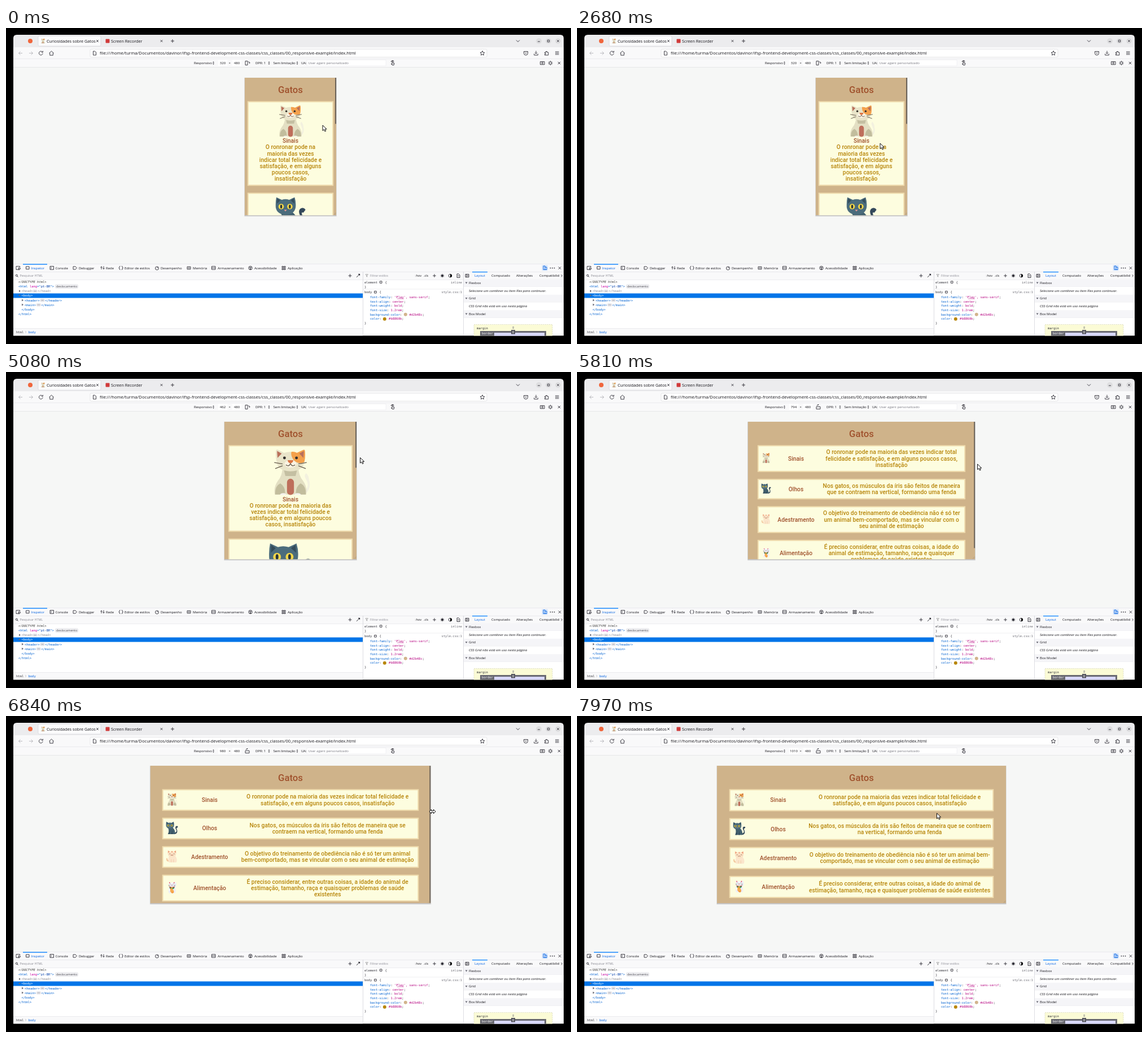
Animation, 1001 px wide and 559 px high, one loop 8000 ms. Source, as an HTML page:

```html
<!DOCTYPE html>
<html lang="pt-BR">
<head>
<meta charset="utf-8">
<title>Gatos</title>
<style>
html, body { margin: 0; width: 100%; height: 100%; overflow: hidden; background: #000; }
svg { display: block; }
text { font-family: "Open Sans", "Noto Sans", sans-serif; white-space: pre; }
.code { font-family: "DejaVu Sans Mono", monospace; }
.page { font-family: Roboto, Arial, sans-serif; font-weight: 500; text-anchor: middle; }
.mid { text-anchor: middle; }
.line { fill: none; stroke: #2b2a33; stroke-width: .9; }
</style>
</head>
<body>
<svg id="stage" width="1001" height="559" viewBox="0 0 1001 559">
<defs>
  <symbol id="cat0" viewBox="0 0 100 100">
    <path d="M78 92Q93 82 84 66Q78 56 84 52Q90 58 90 66Q96 84 82 97Z" fill="#f3f1df"/>
    <path d="M33 40H67Q68 58 77 68Q87 82 84 98H16Q13 82 23 68Q32 58 33 40Z" fill="#e3dfc3"/>
    <path d="M28 74Q16 80 17 98H38Q40 82 28 74ZM72 74Q84 80 83 98H62Q60 82 72 74Z" fill="#c2bd9d"/>
    <path d="M36 46H64L61 58H39Z" fill="#c4bfa2"/>
    <rect x="42.5" y="64" width="15" height="35" rx="7.5" fill="#be6e5b"/>
    <path d="M19 2Q21 0 24 2L36 8Q50 4 64 8L77 2Q80 0 81 3Q83 14 80 26Q79 47 50 48Q21 47 20 26Q17 14 19 2Z" fill="#e9e4c9"/>
    <path d="M52 6Q58 5 64 8L77 2Q80 0 81 3Q83 14 80 28Q67 34 57 24Q50 14 52 6Z" fill="#f4a14c"/>
    <path d="M21 4L31 9.5L22 19ZM79 4L69 9.5L78 19Z" fill="#b9705a"/>
    <ellipse cx="50" cy="32" rx="13" ry="8" fill="#fbf3e2"/>
    <path d="M44 24H56Q56 29 50 31Q44 29 44 24Z" fill="#dc7443"/>
    <path d="M50 31Q47 39 40 34M50 31Q53 39 60 34M33 32L15 29M33 36L17 42M67 32L85 29M67 36L83 42" fill="none" stroke="#665c4e" stroke-width="1.7"/>
    <circle cx="37" cy="19" r="3" fill="#33302c"/><circle cx="63" cy="19" r="3" fill="#33302c"/>
    <path d="M27 99a8 6 0 0 1 15 0ZM58 99a8 6 0 0 1 15 0Z" fill="#f6f3ee"/>
  </symbol>
  <symbol id="cat1" viewBox="0 0 100 100">
    <path d="M66 88Q88 87 85 68Q70 45 82 37Q91 32 97 41L90 50Q82 47 87 58Q102 94 70 98Z" fill="#33485a"/>
    <path d="M20 50H58Q76 66 74 99H18Q30 76 20 50Z" fill="#42606e"/>
    <path d="M34 62L32 99H24ZM52 66L54 99H46Z" fill="#304756"/>
    <path d="M6 2L23 10Q34 6 46 10L63 2Q68 18 66 34Q62 56 35 56Q8 56 4 34Q3 16 6 2Z" fill="#4b6c7c"/>
    <path d="M8 5L18 12L8 22ZM61 5L51 12L62 22Z" fill="#344c5b"/>
    <circle cx="21" cy="31" r="8.5" fill="#f2d64a"/><circle cx="48" cy="31" r="8.5" fill="#f2d64a"/>
    <ellipse cx="21" cy="31" rx="3" ry="6" fill="#26323b"/><ellipse cx="48" cy="31" rx="3" ry="6" fill="#26323b"/>
    <path d="M30 41H39L34 46Z" fill="#e79b98"/>
  </symbol>
  <symbol id="cat2" viewBox="0 0 100 100">
    <path d="M28 90Q4 92 6 68Q10 54 15 68Q14 82 30 78Z" fill="#f3c9a0"/>
    <path d="M28 46H76Q96 72 84 97H26Q16 72 28 46Z" fill="#fbe6cc"/>
    <path d="M18 2L36 12Q50 8 62 12L82 2Q86 22 80 40Q70 56 50 56Q28 56 20 40Q13 20 18 2Z" fill="#fbe3c5"/>
    <path d="M20 5L32 13L20 23ZM80 5L67 13L80 23ZM45 9H55L50 24Z" fill="#ec9873"/>
    <path d="M28 32Q34 26 40 32M60 32Q66 26 72 32M50 38Q46 45 40 41M50 38Q54 45 60 41" fill="none" stroke="#8c5b45" stroke-width="3"/>
    <path d="M46 35H54L50 40Z" fill="#df7060"/>
    <path d="M44 72V96M62 72V96" stroke="#efc7a0" stroke-width="3"/>
  </symbol>
  <symbol id="cat3" viewBox="0 0 100 100">
    <path d="M64 42Q78 34 72 16Q72 6 81 10Q90 28 78 50Z" fill="#eef0f7"/>
    <path d="M30 44H70Q86 70 75 94H27Q16 70 30 44Z" fill="#edeef6"/>
    <path d="M27 5L39 12H59L71 5Q76 22 70 36Q62 46 49 46Q36 46 28 36Q22 20 27 5Z" fill="#f5f5fa"/>
    <path d="M28 7L38 13L28 20ZM70 7L60 13L70 20Z" fill="#e25c6e"/>
    <path d="M33 25Q38 19 42 25M56 25Q61 19 65 25M49 31Q45 38 39 34M49 31Q53 38 59 34M22 30L33 33M22 37L33 36M76 30L65 33M76 37L65 36" fill="none" stroke="#545062" stroke-width="2"/>
    <path d="M45 28H53L49 33Z" fill="#ec6279"/>
    <path d="M29 43Q50 52 71 43L67 58Q50 68 33 58Z" fill="#369457"/>
    <path d="M29 42Q50 52 71 42V47Q50 56 29 47Z" fill="#d73d4b"/>
    <circle cx="50" cy="51" r="5" fill="#f7c24c"/>
    <ellipse cx="49" cy="75" rx="13" ry="21" transform="rotate(-28 49 75)" fill="#f49c3d"/>
    <path d="M42 67L56 82M48 64L60 77M38 74L50 87" stroke="#ffd184" stroke-width="3"/>
    <circle cx="31" cy="68" r="7" fill="#fff"/>
  </symbol>
  <clipPath id="view"><rect id="viewRect" y="88" height="243.36"/></clipPath>
  <clipPath id="window"><path d="M13 544.5V18Q13 12 19 12H982Q988 12 988 18V544.5Z"/></clipPath>
</defs>
<rect width="1001" height="559"/>
<g id="chrome" clip-path="url(#window)"></g>
<g id="size"></g>
<g id="device"></g>
<path id="arrow" d="M0 0V9.6L2.3 7.5L4 11L5.7 10.2L4.1 6.9H7.2Z" fill="#fff" stroke="#111" stroke-width="1"/>
<path id="resize" d="M-5.5 0L-2 -3.6V-1.3H2V-3.6L5.5 0L2 3.6V1.3H-2V3.6Z" fill="#fff" stroke="#111" stroke-width="1"/>
</svg>
<script>
const $ = id => document.getElementById(id);
const esc = s => s.replace(/&/g, '&amp;').replace(/</g, '&lt;');
const rect = (x, y, w, h, fill, more = '') => `<rect x="${x}" y="${y}" width="${w}" height="${h}" fill="${fill}" ${more}/>`;
const text = (x, y, s, size = 6, fill = '#15141a', cls = '') =>
  `<text x="${x}" y="${y}" font-size="${size}" fill="${fill}" class="${cls}">${esc(s)}</text>`;
const line = (d, color = '#2b2a33', width = .9) => `<path class="line" d="${d}" style="stroke:${color};stroke-width:${width}"/>`;
const dot = (x, y, r, fill) => `<circle cx="${x}" cy="${y}" r="${r}" fill="${fill}"/>`;
const ring = (x, y, r) => `<circle class="line" cx="${x}" cy="${y}" r="${r}"/>`;
const cross = (x, y, r = 2) => line(`M${x - r} ${y - r}l${2 * r} ${2 * r}m0 ${-2 * r}l${-2 * r} ${2 * r}`);
const plus = (x, y, r = 3) => line(`M${x - r} ${y}h${2 * r}M${x} ${y - r}v${2 * r}`);
const box = (x, y, w, h) => line(`M${x} ${y}h${w}v${h}h${-w}Z`);
const picker = (x, y) => `<path d="M${x - 1.4} ${y - .7}h2.8l-1.4 -2ZM${x - 1.4} ${y + .7}h2.8l-1.4 2Z" fill="#2b2a33"/>`;
const twisty = (x, y, open) => `<path d="${open ? `M${x - 2} ${y - 1}h4l-2 3Z` : `M${x - 1} ${y - 2}v4l3 -2Z`}" fill="#6a6a75"/>`;
// Code made of [text, colour] runs.
const code = (x, y, ...runs) => `<text x="${x}" y="${y}" font-size="5.5" class="code">` +
  runs.map(([s, c]) => `<tspan fill="${c}">${esc(s)}</tspan>`).join('') + '</text>';
const badge = (x, y) => rect(x, y - 2, 7, 4.4, '#eeeef2', 'rx="1.5" stroke="#b9b9c2" stroke-width=".4"') +
  [2, 3.5, 5].map(d => dot(x + d, y + .2, .5, '#55555f')).join('');

function browserBars() {
  return rect(13, 12, 975, 22, '#ececee') + rect(13, 34, 975, 20, '#f9f9fa') + rect(13, 54, 975, 15, '#f9f9fa') +
    rect(13, 54, 975, .5, '#dcdce0') + rect(13, 69, 975, 348, '#f6f7f6') + rect(13, 69, 975, .6, '#dedee2') +
    dot(43, 23, 4, '#f0663c') +
    rect(57, 14, 111, 18, '#fbfbfc', 'rx="2" stroke="#cfcfd4" stroke-width=".6"') +
    '<use href="#cat0" x="61" y="18.5" width="9" height="9"/>' + text(72, 25.6, 'Curiosidades sobre Gatos', 7.27) + cross(162, 23, 1.8) +
    rect(176.5, 19.5, 7, 7, '#d03a3a', 'rx="1"') + text(186, 25.6, 'Screen Recorder', 7.27) + cross(275.5, 23, 1.8) + plus(295, 23) +
    line('M904 21.5l3 3l3 -3') + [944, 961, 978].map(x => dot(x, 23, 5, '#dedee0')).join('') +
    line('M942 24h4') + box(959.3, 21.3, 3.4, 3.4) + cross(978, 23, 1.7) +
    line('M29 44.5h-6.5m3 -3l-3 3l3 3M41 44.5h6.5m-3 -3l3 3l-3 3', '#b5b5ba') +
    line('M64.6 42.5a3.4 3.4 0 1 0 .6 2.5M65.3 40.5v2.5h-2.5') + line('M76.5 44.5l4 -3.6l4 3.6M77.7 44v4.2h5.6V44') +
    rect(149, 37.5, 703, 14, '#fff', 'rx="2" stroke="#d8d8dc" stroke-width=".6"') +
    line('M154.5 41h3l2 2v5h-5Z') +
    text(166, 47.2, 'file:///home/turma/Documentos/davinor/ifsp-frontend-development-css-classes/css_classes/00_responsive-example/index.html', 7.65) +
    line('M844 40.5l1.2 2.6l2.8 .3l-2.1 1.9l.6 2.8l-2.5 -1.5l-2.5 1.5l.6 -2.8l-2.1 -1.9l2.8 -.3Z') +
    line('M917.5 41.5h7v3a3.5 3.5 0 0 1 -7 0ZM919.3 43.4l1.7 1.7l1.7 -1.7') + line('M939 40.5v5m-2 -2l2 2l2 -2M935.7 45.5v2.5h6.6v-2.5') +
    line('M954.5 43h2v-1.5h2V43h2.3v5h-6.3v-1.6h1.4v-1.8h-1.4Z') + line('M973 42h6.6M973 44.4h6.6M973 46.8h6.6') +
    text(333, 64.2, 'Responsivo', 6) + picker(367.5, 62) + text(396.2, 64.2, '×', 6, '#333', 'mid') +
    rect(376, 56.5, 16, 10.5, '#fff') + rect(401, 56.5, 16, 10.5, '#fff') + text(409, 64.2, '480', 6.1, '#15141a', 'mid') +
    text(442, 64.2, 'DPR: 1', 6) + picker(466, 62) + text(473.5, 64.2, 'Sem limitação', 6) + picker(516, 62) +
    text(523, 64.2, 'UA:', 6) + rect(533, 56.5, 140, 10.5, '#fff', 'stroke="#e6e6ea" stroke-width=".5"') +
    text(535.5, 64.2, 'User agent personalizado', 6, '#777780') +
    line('M684 64.5v-5.5a.9 .9 0 0 1 1.8 0v3h2l-.6 3.6h-3l-1.8 -2.3ZM682 60a3 3 0 0 1 5.5 -1') +
    box(946.5, 59.5, 7.5, 5.2) + ring(950.2, 62, 1.3) + ring(964.5, 62, 2.2) +
    line('M964.5 58v1.4m0 5.2v1.4M960.5 62h1.4m5.2 0h1.4M961.7 59.2l1 1m3.6 3.6l1 1m0 -5.6l-1 1m-3.6 3.6l-1 1') + cross(980, 62, 2.2);
}

function inspectorBars() {
  const tabs = [[44.5, 'Inspetor'], [87.5, 'Console'], [129, 'Debugger'], [177, 'Rede'], [210, 'Editor de estilos'],
    [274, 'Desempenho'], [331, 'Memória'], [375, 'Armazenamento'], [440, 'Acessibilidade'], [499, 'Aplicação']];
  const icons = line('M24 427.5h-6v-6h6.5v2.5M21.5 424l4.5 1.6l-1.9 .7l-.8 1.9Z') + box(35.5, 422, 5.5, 4.6) +
    box(78, 421.5, 6.5, 5.8) + line('M79.3 423l1.3 1.4l-1.3 1.4') + line('M119 422h4l2.5 2.5l-2.5 2.5h-4Z') +
    line('M169 427v-5m-1.6 1.6l1.6 -1.6l1.6 1.6M173 421.5v5m-1.6 -1.6l1.6 1.6l1.6 -1.6') +
    line('M202.5 421.2q-1.6 0 -1.4 1.6q0 1.4 -1.3 1.6q1.3 .2 1.3 1.6q-.2 1.6 1.4 1.6M204.8 421.2q1.6 0 1.4 1.6q0 1.4 1.3 1.6q-1.3 .2 -1.3 1.6q.2 1.6 -1.4 1.6') +
    ring(267.5, 425, 3) + line('M267.5 425l1.5 -2') + box(321, 422.3, 6, 4.4) + line('M323 423.5v2M325 423.5v2') +
    box(364.5, 421.6, 6.4, 5.6) + line('M364.5 424.4h6.4') + ring(433, 424.5, 3.2) + line('M431 423.6h4M433 423.6v1.6l-1 2m1 -2l1 2') +
    box(489, 421.6, 2.3, 2.3) + box(492.7, 421.6, 2.3, 2.3) + box(489, 425.2, 2.3, 2.3) + box(492.7, 425.2, 2.3, 2.3);
  return rect(13, 417, 975, 127.5, '#fff') + rect(13, 417, 975, 28, '#f9f9fa') +
    [417, 431, 445].map(y => rect(13, y, 975, .5, '#d9d9de')).join('') + rect(30, 417.3, 43, 1.4, '#0a84ff') + icons +
    tabs.map(([x, s], i) => text(x, 426.6, s, 6, i ? '#15141a' : '#0061e0')).join('') +
    rect(949.5, 419.3, 10, 10, '#d7e6fb') + line('M952 421h3v6.5h-3ZM955 423h3v4.5h-3', '#0061e0') +
    [964.5, 968, 971.5].map(x => dot(x, 424.6, .9, '#2b2a33')).join('') + cross(981, 424.6, 2.2) +
    ring(18.8, 437.7, 1.6) + line('M20 439l1.6 1.6') + text(24.5, 440.3, 'Pesquisar HTML', 5.4, '#8a8a93') +
    plus(609.5, 438.2) + line('M621 441l4 -4M624 435l3 3') + dot(626, 436, 1.3, '#2b2a33');
}

function tree() {
  const tag = '#0061d0', grey = '#8d8d96', white = '#fff';
  return rect(13, 469.5, 619, 8, '#0074e8') +
    '<g font-style="italic">' + code(22, 451.3, ['<!DOCTYPE html>', '#333']) + '</g>' +
    code(22, 459.2, ['<html ', tag], ['lang', '#c800a1'], ['="', tag], ['pt-BR', '#003eaa'], ['">', tag]) +
    rect(87.5, 453.8, 40, 6.6, '#f6f6f8', 'rx="2" stroke="#c8c8d0" stroke-width=".5"') + text(89, 459, 'deslocamento', 5.7, '#45454e') +
    twisty(24, 465.3) + code(27.5, 467.2, ['<head>', grey]) + badge(48, 465.2) + code(56.3, 467.2, ['</head>', grey]) +
    twisty(24, 473, true) + code(27.5, 475.4, ['<body>', white]) +
    twisty(29, 481.5) + code(33, 483.5, ['<header>', tag]) + badge(61, 481.6) + code(69.3, 483.5, ['</header>', tag]) +
    twisty(29, 489.6) + code(33, 491.6, ['<main>', tag]) + badge(54.3, 489.6) + code(62.5, 491.6, ['</main>', tag]) +
    code(27.5, 499.6, ['</body>', tag]) + code(22, 507.7, ['</html>', tag]) +
    rect(13, 531.5, 619, 13, '#f9f9fa') + rect(13, 531.3, 619, .5, '#d9d9de') +
    code(18, 540, ['html', '#33333b']) + line('M34 536l1.6 1.8l-1.6 1.8', '#99999f', .6) + code(39.5, 540, ['body', '#0061e0']);
}

function styles() {
  const ink = '#33333b', prop = '#0061d0', val = '#b5007f';
  const rules = [['font-family', "'Play', sans-serif"], ['text-align', 'center'], ['font-weight', 'bold'], ['font-size', '1.2rem'],
    ['background-color', '   #d2b48c'], ['color', '   #b8860b']];
  return rect(632, 431, .7, 113.5, '#cfcfd6') +
    line('M637 435.8h4.4l-1.7 2v2.4l-1 -.7v-1.7Z', '#777', .6) + text(645, 440.3, 'Filtrar estilos', 5.4, '#8a8a93') +
    text(725, 440.2, ':hov', 5.6) + text(740, 440.2, '.cls', 5.6) + plus(759, 438.2, 2.8) + dot(773, 438.2, 2, '#2b2a33') +
    line('M773 434.6v7.2M769.4 438.2h7.2M770.5 435.7l5 5m0 -5l-5 5', '#2b2a33', .6) +
    ring(787, 438.2, 2.8) + '<path d="M787 435.4a2.8 2.8 0 0 1 0 5.6Z"/>' + line('M799 435h3l2 2v4.5h-5ZM800.3 438.5h2.3') +
    code(635, 451.5, ['element', ink]) + box(662.4, 447.9, 3.6, 3.4) + code(671.5, 451.5, ['{', ink]) + code(788, 451.5, ['inline', '#66666f']) +
    code(635, 459.6, ['}', ink]) + rect(633, 461.7, 177, .5, '#dedee3') +
    code(635, 469, ['body', ink]) + box(652.6, 465.5, 3.6, 3.4) + code(661.5, 469, ['{', ink]) + code(771.5, 469, ['style.css:1', '#66666f']) +
    rules.map(([p, v], i) => code(645, 477.8 + i * 7.7, [p, prop], [': ', ink], [v, val], [';', ink])).join('') +
    line('M693 479h12', val, .5) + dot(707.8, 506.8, 3, '#d2b48c') + dot(670.8, 514.7, 3, '#b8860b') +
    code(635, 523.6, ['}', ink]);
}

function layoutPane() {
  const heads = [[450.6, 'Flexbox'], [478.2, 'Grid'], [505.6, 'Box Model']];
  return rect(810, 431, .7, 113.5, '#cfcfd6') + box(814, 435.6, 6, 5.2) + line('M816 435.6v5.2M819 437l-1.4 1.2l1.4 1.2') +
    rect(826, 431, 27, 1.3, '#0a84ff') + text(830, 440.3, 'Layout', 6, '#0061e0') + text(860, 440.3, 'Computado', 6) +
    text(904, 440.3, 'Alterações', 6) + text(945, 440.3, 'Compatibilid', 6) + line('M983.5 436.5l2 1.8l-2 1.8') +
    heads.map(([y, s]) => rect(811, y - 6.4, 177, 13, '#f5f5f8') + rect(811, y + 6.6, 177, .4, '#dedee3') +
      twisty(815.6, y - .2, true) + text(820, y + 2.2, s, 6)).join('') +
    '<g font-style="italic">' + text(820, 466.5, 'Selecione um contêiner ou item Flex para continuar.', 6) +
    text(820, 494, 'CSS Grid não está em uso nesta página', 6) + '</g>' +
    rect(829, 524.5, 139, 22, '#fbfbd6', 'stroke="#c9c9b4" stroke-width=".6" stroke-dasharray="2 1.5"') +
    code(834, 532.6, ['margin', '#33333b']) + code(897, 531.5, ['8', '#77777f']) +
    rect(840, 536, 117, 9, '#696971') + code(843, 542.4, ['border', '#f4f4f6']) + rect(865, 539, 89, 6, '#d9d9fb') +
    rect(895, 534, 7, 7.5, '#55555e') + code(896.8, 539.8, ['0', '#fff']);
}

$('chrome').innerHTML = browserBars() + inspectorBars() + tree() + styles() + layoutPane();

const SCALE = .507, MID = 504, TOP = 88, VIEW = 480 * SCALE, LEAD = 11.15, GAP = 12.1, PAD = 7;
const SIENNA = '#a0522d', GOLD = '#b8860b';
const cards = [
  ['Sinais', 'O ronronar pode na maioria das vezes indicar total felicidade e satisfação, e em alguns poucos casos, insatisfação'],
  ['Olhos', 'Nos gatos, os músculos da íris são feitos de maneira que se contraem na vertical, formando uma fenda'],
  ['Adestramento', 'O objetivo do treinamento de obediência não é só ter um animal bem-comportado, mas se vincular com o seu animal de estimação'],
  ['Alimentação', 'É preciso considerar, entre outras coisas, a idade do animal de estimação, tamanho, raça e quaisquer problemas de saúde existentes'],
];

const pen = document.createElement('canvas').getContext('2d');
pen.font = '100px Roboto, Arial, sans-serif';
pen.fontKerning = 'none';

// Breaks at spaces and after hyphens; the limit is in em.
function wrap(copy, limit) {
  const lines = [''];
  for (const word of copy.match(/[^\s-]+-?\s?/g)) {
    const last = lines.length - 1;
    if (pen.measureText((lines[last] + word).trim()).width > limit * 100) lines.push(word);
    else lines[last] += word;
  }
  return lines.map(s => s.trim());
}

function page(cssWidth, scrolled) {
  const width = cssWidth * SCALE, left = MID - width / 2, wide = cssWidth >= 600;
  const margin = width * (wide ? .0425 : .03), cardW = width - 2 * margin, x = left + margin;
  const limit = wide ? 24 + (cardW - 368) * .0753 : cardW * .071;
  const label = (cx, cy, s, fill) => text(cx, cy + 3.5, s, 10.3, fill, 'page');
  const icon = (i, cx, y, size) => `<use href="#cat${i}" x="${cx - size / 2}" y="${y}" width="${size}" height="${size}"/>`;
  let y = 129.4, out = text(MID, 114.5, 'Gatos', 16.7, SIENNA, 'page');
  cards.forEach(([name, copy], i) => {
    const lines = wrap(copy, limit), slot = wide ? cardW * .0535 : width * .356;
    const inner = wide ? Math.max(lines.length * LEAD, slot) : slot + LEAD * (lines.length + 1);
    const h = inner + 2 * PAD, cy = y + h / 2;
    out += rect(x + 1, y + 1, cardW - 2, h - 2, '#fdfddf', 'stroke="#efdbad" stroke-width="2"');
    if (wide) {
      const size = cardW * .05;
      out += icon(i, x + 6 + size / 2, cy - 1 - size / 2, size) + label(x + cardW * .185, cy, name, SIENNA);
    } else {
      out += icon(i, MID, y + PAD, width * .35) + label(MID, y + PAD + slot + LEAD / 2, name, SIENNA);
    }
    const first = wide ? cy - (lines.length - 1) * LEAD / 2 : y + PAD + slot + LEAD * 1.5;
    const cx = wide ? x + cardW * .6445 : MID;
    lines.forEach((s, n) => out += label(cx, first + n * LEAD, s, GOLD));
    y += h + GAP;
  });
  const content = y - GAP + 4 - TOP, range = Math.max(0, content - VIEW);
  const thumb = VIEW * VIEW / content - (range > 5 ? 4 : 0);
  $('viewRect').setAttribute('x', left);
  $('viewRect').setAttribute('width', width);
  return rect(left, TOP + .6, width, VIEW + .6, '#c9c9cc', 'stroke="#00000018" stroke-width="1.6"') +
    `<g clip-path="url(#view)">${rect(left, TOP, width, VIEW, '#cfb38a')}
    <g transform="translate(0 ${-scrolled * range})">${out}</g>
    ${range > 0 ? rect(left + width - 2, TOP + scrolled * (VIEW - thumb), 2, thumb, '#655e56') : ''}</g>` +
    line(`M${left + width - 4.5} 330.5l4 -4M${left + width - 2.5} 330.5l2 -2`, '#a5937a', .6);
}

// Keys are [time, ...values], joined by straight lines.
function at(keys, t) {
  const i = keys.findIndex(k => k[0] > t);
  if (i === 0) return keys[0].slice(1);
  if (i < 0) return keys[keys.length - 1].slice(1);
  const a = keys[i - 1], b = keys[i], u = (t - a[0]) / (b[0] - a[0]);
  return a.slice(1).map((v, n) => v + (b[n + 1] - v) * u);
}
const widths = [[4220, 320], [4910, 455], [5080, 462], [5230, 468], [5810, 794], [6120, 870], [6840, 980], [6940, 980], [7300, 1010]];
const scrolls = [[520, 0], [1040, 1], [1240, 1], [1480, 0]];
const pointer = [[90, 561, 172], [370, 537, 204], [3400, 537, 204], [3780, 587, 145], [4220, 587, 145], [4910, 625, 151],
  [5080, 627.5, 151.5], [5230, 628.5, 152], [5810, 709.5, 163], [6120, 729.5, 167], [6840, 755.5, 169], [6940, 755.5, 169],
  [7300, 763, 169], [7400, 763, 169], [7700, 640, 172], [7970, 637.5, 172]];

let shown = '';
function draw(t) {
  const width = Math.round(at(widths, t)[0]), [scrolled] = at(scrolls, t), [x, y] = at(pointer, t);
  const key = width + '/' + scrolled;
  if (key !== shown) {
    shown = key;
    $('device').innerHTML = page(width, scrolled);
    $('size').innerHTML = text(384, 64.2, String(width), 6.1, '#15141a', 'mid') +
      (width > 480 ? box(424, 61.5, 7, 4) + line('M425 60q0 -2 3 -2m-1 -1l1 1l-1 1') : box(424, 58.5, 4, 7) + line('M429.5 59.5q2 0 2 3m-1 -1l1 1l1 -1'));
  }
  const onEdge = (t >= 3700 && t < 4220) || (t >= 6780 && t < 7400);
  for (const id of ['arrow', 'resize']) {
    $(id).setAttribute('transform', `translate(${x} ${y})`);
    $(id).style.display = (id === 'resize') === onEdge ? '' : 'none';
  }
}

const start = performance.now();
function tick() {
  draw((performance.now() - start) % 8000);
  requestAnimationFrame(tick);
}
tick();
</script>
</body>
</html>
```
